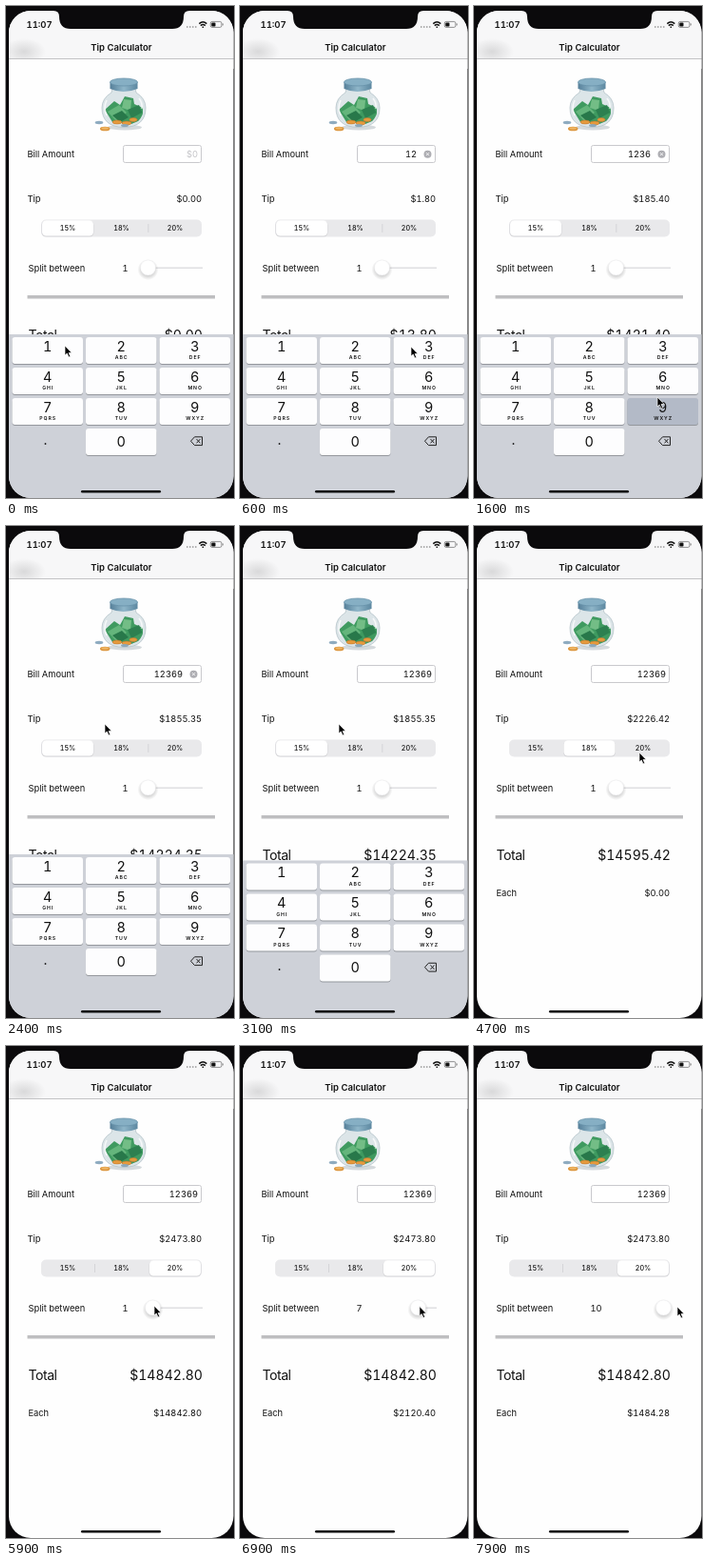
An HTML page that plays this animation: 240x517 px, repeating every 8000 ms.

```html
<!DOCTYPE html>
<html lang="en">
<head>
<meta charset="utf-8">
<title>Tip Calculator</title>
<style>
  html, body { margin: 0; width: 100%; height: 100%; overflow: hidden; background: #0b0a0c; }
  svg { display: block; width: 100%; height: 100%; }
  text { font: 9.3px Inter, Roboto, sans-serif; font-feature-settings: "tnum"; fill: #111; }
  .end { text-anchor: end; }
  .mid { text-anchor: middle; }
  .title { font-size: 9.5px; font-weight: 600; }
  .big { font-size: 14.1px; }
  .segment { font-size: 7.2px; font-weight: 500; text-anchor: middle; }
  .digit { font-size: 14.5px; text-anchor: middle; }
  .letters { font-size: 5.2px; font-weight: 600; letter-spacing: .9px; text-anchor: middle; }
</style>
</head>
<body>
<svg viewBox="0 0 240 517" preserveAspectRatio="none">
  <defs>
    <clipPath id="screen"><rect x="3" y="5" width="236.5" height="512" rx="23"/></clipPath>
    <clipPath id="glass"><ellipse cx="124" cy="107" rx="21" ry="20.5"/></clipPath>
    <linearGradient id="lid">
      <stop stop-color="#557f99"/><stop offset=".5" stop-color="#8fb6c9"/><stop offset="1" stop-color="#5c87a0"/>
    </linearGradient>
    <radialGradient id="smudge">
      <stop stop-color="#d9d9da"/><stop offset="1" stop-color="#d9d9da" stop-opacity="0"/>
    </radialGradient>
    <radialGradient id="shadow">
      <stop offset=".6" stop-opacity=".16"/><stop offset="1" stop-opacity="0"/>
    </radialGradient>
  </defs>

  <rect width="240" height="517" fill="#0b0a0c"/>
  <g clip-path="url(#screen)">
    <rect width="240" height="517" fill="#fefefe"/>
    <rect width="240" height="55" fill="#f7f7f8"/>
    <ellipse cx="19" cy="48" rx="23" ry="14" fill="url(#smudge)"/>
    <rect y="55" width="240" height="1" fill="#c3c3c5"/>
    <rect y="56" width="240" height="10" fill="#fefefe"/>
    <text class="title mid" x="121.5" y="46.5">Tip Calculator</text>

    <!-- status bar -->
    <text class="title" x="21.5" y="23">11:07</text>
    <path d="M190 22h11" stroke="#999" stroke-width="1.5" stroke-dasharray="1.5 1.5"/>
    <g fill="none" stroke="#111" stroke-width="1.5">
      <path d="M203.3 18.6q4-3.6 8 0M204.8 20.6q2.5-2.2 5 0"/>
      <path d="M206.6 22.2h1.4"/>
    </g>
    <rect x="215.3" y="16.4" width="11.6" height="6" rx="1.6" fill="none" stroke="#777" stroke-width=".8"/>
    <rect x="216.3" y="17.4" width="4.2" height="4" rx=".7" fill="#111"/>
    <path d="M228.2 18.4v2" stroke="#777"/>

    <!-- tip jar -->
    <ellipse cx="125" cy="127.5" rx="18" ry="3" fill="#d5dadd"/>
    <path d="M112 87h24l1 4q10 6 10 16 0 20-23 20.500-23-.5-23-20.500 0-10 10-16z" fill="#dce5e8" stroke="#b5c3c9" stroke-width=".8"/>
    <g clip-path="url(#glass)">
      <path d="M104 109l10-9 6 4 5-9 9 2 1 6 9 4v12l-12 5-20-2z" fill="#3f9a60"/>
      <path d="M107 111l12-7 8 8-11 9z" fill="#64b57c"/>
      <path d="M124 98l8 1-1 11-9-3z" fill="#73bd86"/>
      <path d="M128 109l12-5 3 8-11 6z" fill="#2d8050"/>
      <path d="M112 115l10-5 7 7-9 5z" fill="#28784a"/>
      <g fill="#e59a3c" stroke="#ba7129" stroke-width=".5">
        <ellipse cx="117" cy="122" rx="5" ry="2"/>
        <ellipse cx="127" cy="123" rx="5" ry="2"/>
        <ellipse cx="134" cy="119.500" rx="4" ry="2"/>
      </g>
      <ellipse cx="125" cy="125.500" rx="4" ry="1.500" fill="#8da8b9"/>
    </g>
    <path d="M106 99q-4 8 0 16M140 97q4 5 3 11" fill="none" stroke="#fff" stroke-width="1.6" opacity=".75"/>
    <path d="M109.500 80v7q14 6 29 0v-7z" fill="url(#lid)"/>
    <ellipse cx="124" cy="80" rx="14.5" ry="4" fill="#86afc4" stroke="#648ea6" stroke-width=".7"/>
    <ellipse cx="98" cy="122.500" rx="4.300" ry="1.700" fill="#8eabc0"/>
    <ellipse cx="104.200" cy="129" rx="5.300" ry="2.300" fill="#dc963e"/>
    <ellipse cx="104.200" cy="128.500" rx="3.600" ry="1.200" fill="#eeb563"/>

    <!-- form -->
    <text x="22.500" y="159">Bill Amount</text>
    <rect x="123.500" y="146.500" width="82" height="18" rx="2" fill="#fff" stroke="#c9c9cd"/>
    <text id="amount" class="end" y="158.500"></text>
    <g id="clear">
      <circle cx="197.500" cy="155.700" r="4" fill="#adadb2"/>
      <path d="M196 154.200l3 3m0-3l-3 3" stroke="#fff" stroke-width=".9"/>
    </g>
    <text x="22.500" y="205.500">Tip</text>
    <text id="tip" class="end" x="206" y="205.500"></text>

    <rect x="37" y="224.500" width="169" height="18" rx="5" fill="#e9e9eb"/>
    <path id="leftRule" d="M93.500 229v9" stroke="#cfcfd3" stroke-width=".8"/>
    <path id="rightRule" d="M149.800 229v9" stroke="#cfcfd3" stroke-width=".8"/>
    <g id="pill">
      <rect x="37.500" y="225.600" width="55" height="17" rx="4.500" fill="#d6d6d9"/>
      <rect x="38" y="225.300" width="54" height="16.300" rx="4.300" fill="#fff"/>
    </g>
    <text class="segment" x="65" y="236.200">15%</text>
    <text class="segment" x="121.500" y="236.200">18%</text>
    <text class="segment" x="178" y="236.200">20%</text>

    <text x="23.500" y="279.200">Split between</text>
    <text id="people" x="122.500" y="279"></text>
    <path id="track" stroke="#dfdfe2" stroke-width="1.400"/>
    <g id="thumb">
      <circle cy="277" r="11" fill="url(#shadow)"/>
      <circle cy="275" r="8" fill="#fff" stroke="#e6e6e8" stroke-width=".4"/>
    </g>

    <rect x="22.500" y="304" width="197.500" height="3.500" fill="#bebec0"/>
    <text class="big" style="letter-spacing:-.5px" x="23.500" y="351">Total</text>
    <text id="total" class="big end" x="207" y="351"></text>
    <text x="23.500" y="389">Each</text>
    <text id="each" class="end" x="206" y="389"></text>

    <g id="keyboard">
      <rect y="345" width="240" height="180" fill="#ced1d8"/>
      <g id="keys"></g>
      <text class="digit" x="41.500" y="460.500">.</text>
      <path d="M194.500 457.200l4-4.400h8v8.800h-8zM200.500 455l4 4.400m0-4.400l-4 4.400" fill="none" stroke="#222" stroke-width="1"/>
    </g>
    <rect x="79" y="509" width="84" height="2.600" rx="1.300" fill="#0b0b0b"/>
  </g>
  <path d="M50 0V5q6 0 6 6 0 13 12 13h107q12 0 12-13 0-6 6-6V0z" fill="#0b0a0c"/>
  <path id="cursor" d="M0 0V10L2.300 8 4 12 5.700 11.200 4.100 7.500H7.200z" fill="#000" stroke="#fff" stroke-width=".7"/>
</svg>

<script>
const LOOP = 8000, STEP = 100;
const EDIT_END = 3000, DISMISS = 3095, SLIDER_TOUCH = 5600;
const THUMB_MIN = 149.5, THUMB_MAX = 199.5;
const el = id => document.getElementById(id);
const clamp = (v, lo, hi) => Math.min(hi, Math.max(lo, v));
const progress = (t, start, length) => clamp((t - start) / length, 0, 1);
const easeOut = p => 1 - (1 - p) ** 3;
const easeInOut = p => p * p * (3 - 2 * p);
const money = v => '$' + v.toFixed(2);

// [digit, pressed at, released at]
const presses = [['1', 100, 200], ['2', 400, 500], ['3', 700, 800], ['6', 1200, 1300], ['9', 1600, 1700]];

// [time, x, y] of the pointer tip
const route = [
  [0, 62, 357], [200, 62, 357], [400, 122, 359], [500, 126, 359], [600, 180, 358], [900, 182, 359],
  [1200, 192, 388], [1300, 192, 390], [1500, 193, 411], [1700, 193, 411], [1800, 177, 270],
  [2100, 115, 214], [2400, 104, 208], [3100, 104, 208], [3500, 118, 227], [3700, 124, 233],
  [4400, 124, 233], [4700, 174, 238], [5100, 174, 238], [5500, 156, 273], [5900, 156, 273],
  [7600, 212, 274], [7900, 214, 274]
];

function pointerAt(t) {
  const next = route.findIndex(point => point[0] > t);
  if (next < 0) return route.at(-1).slice(1);
  const [t0, x0, y0] = route[next - 1], [t1, x1, y1] = route[next];
  const p = (t - t0) / (t1 - t0);
  return [x0 + (x1 - x0) * p, y0 + (y1 - y0) * p];
}

const letters = ['', 'ABC', 'DEF', 'GHI', 'JKL', 'MNO', 'PQRS', 'TUV', 'WXYZ'];
function keyMarkup(digit, column, row, caption) {
  const x = 6.5 + 77.5 * column, y = 348 + 32 * row, middle = x + 37.2;
  return `<rect x="${x}" y="${y + 1}" width="74.5" height="28" rx="3" fill="#94979d"/>
    <rect id="key${digit}" x="${x}" y="${y}" width="74.5" height="28" rx="3"/>
    <text class="digit" x="${middle}" y="${y + (row === 3 ? 19 : 15)}">${digit}</text>
    <text class="letters" x="${middle + .4}" y="${y + 23.2}">${caption}</text>`;
}
el('keys').innerHTML = letters.map((caption, i) =>
  keyMarkup(i + 1, i % 3, Math.floor(i / 3), caption)).join('') + keyMarkup(0, 1, 3, '');
for (let digit = 0; digit < 10; digit++) el('key' + digit).setAttribute('fill', '#fdfdfe');

const move = (id, x, y) => el(id).setAttribute('transform', `translate(${x} ${y})`);
const show = (id, visible) => el(id).setAttribute('opacity', visible ? 1 : 0);

function draw(t) {
  const [x, y] = pointerAt(t);
  move('cursor', x, y);

  let typed = '';
  for (const [digit, down, up] of presses) {
    if (t >= up) typed += digit;
    el('key' + digit).setAttribute('fill', t >= down && t < up ? '#b3bac7' : '#fdfdfe');
  }
  const editing = typed !== '' && t < EDIT_END;
  el('amount').textContent = typed || '$0';
  el('amount').setAttribute('x', editing ? 186 : 202);
  el('amount').style.fill = typed ? '#111' : '#c4c4c8';
  show('clear', editing);

  const rate = t < 3900 ? .15 : t < 4900 ? .18 : .2;
  const tip = typed * rate, total = +typed + tip;
  const pill = easeInOut(progress(t, 3850, 300)) + easeInOut(progress(t, 4850, 300));
  move('pill', 56.5 * pill, 0);
  show('leftRule', pill > 1.5);
  show('rightRule', pill < .5);

  const thumb = t < SLIDER_TOUCH ? THUMB_MIN : clamp(x - 1.5, THUMB_MIN, THUMB_MAX);
  const people = Math.floor(1 + 9 * (thumb - THUMB_MIN) / (THUMB_MAX - THUMB_MIN));
  move('thumb', thumb, 0);
  el('track').setAttribute('d', `M${thumb} 275.300H207`);

  el('people').textContent = people;
  el('tip').textContent = money(tip);
  el('total').textContent = money(total);
  el('each').textContent = money(t < SLIDER_TOUCH ? 0 : total / people);

  move('keyboard', 0, 175 * easeOut(progress(t, DISMISS, 400)));
}

function tick() {
  draw(Math.floor(performance.now() % LOOP / STEP) * STEP);
  requestAnimationFrame(tick);
}
tick();
</script>
</body>
</html>
```
